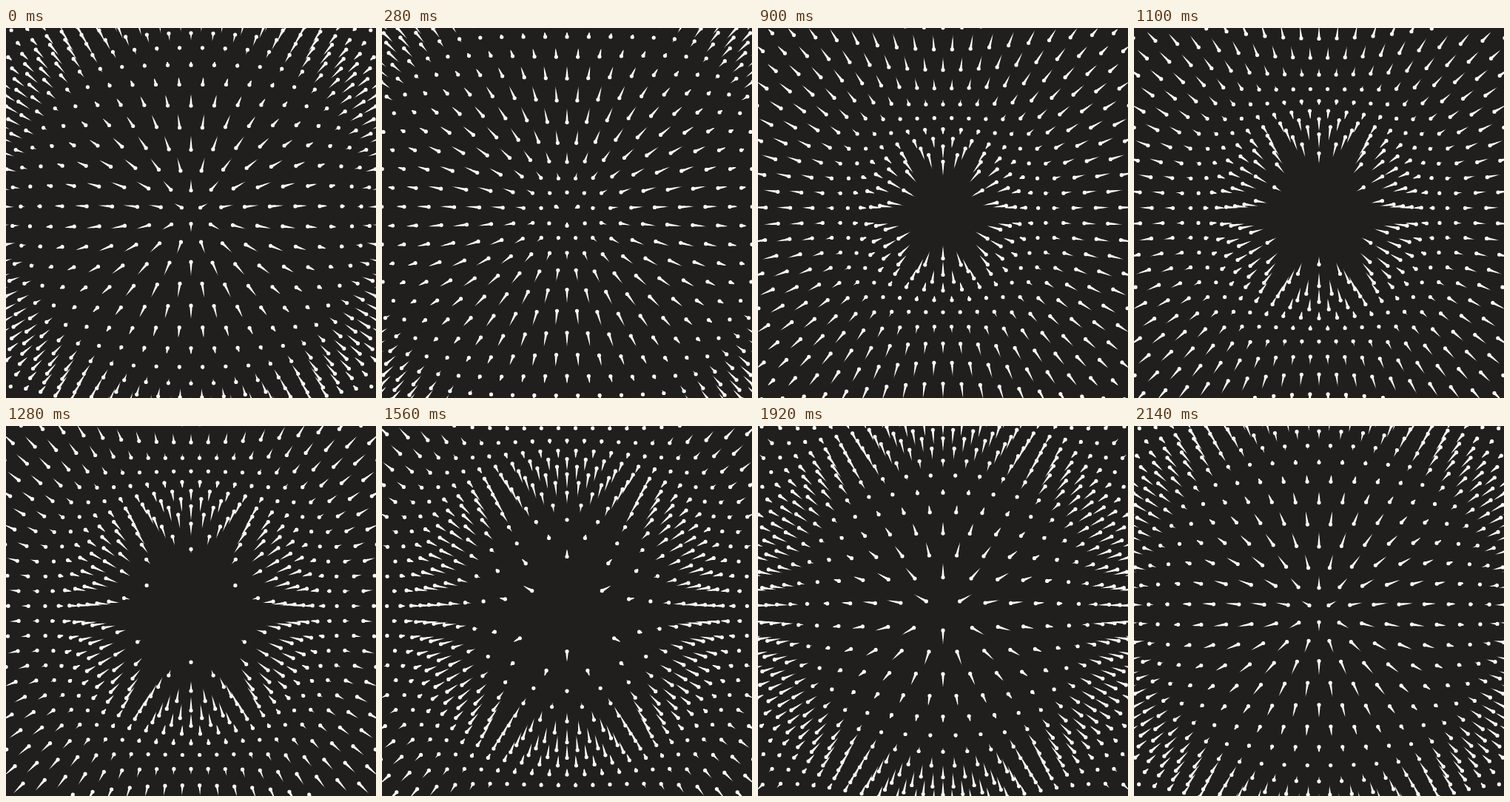
These frames come from a looping animation (500x500 px, 2160 ms). An HTML page with a canvas:

```html
<!DOCTYPE html>
<html lang="en">
<head>
<meta charset="utf-8">
<title>Radial wave</title>
<style>
  html, body { margin: 0; width: 100%; height: 100%; overflow: hidden; background: #201f1e; }
  canvas { display: block; width: 500px; height: 500px; }
</style>
</head>
<body>
<canvas id="stage" width="500" height="500"></canvas>
<script>
const SIZE = 500, CENTER = SIZE / 2;
const LOOP = 2160, TICK = 20;
const ROW = 20, COLUMN = ROW * 2 / Math.sqrt(3);
const WAVELENGTH = 360, PUSH = 57, DELAY = 20;
const HEAD = 2.6, TAIL = 1.9, TRAIL = 0.12, TRAIL_STEPS = 24;
const TAU = Math.PI * 2;

const ctx = document.getElementById('stage').getContext('2d');

// Triangular lattice with the centroid of one triangle at the middle of the stage.
const points = [];
for (let j = -18; j <= 18; j++) {
  const y = ROW * (j + 2 / 3);
  const shift = j % 2 ? COLUMN / 2 : 0;
  for (let i = -16; i <= 16; i++) {
    const x = i * COLUMN + shift;
    const radius = Math.hypot(x, y);
    if (radius < 365) points.push({ radius, ux: x / radius, uy: y / radius });
  }
}

function waveRadius(radius, phase) {
  return radius + PUSH / 2 * (1 - Math.cos(TAU * (phase - radius / WAVELENGTH)));
}

function addDot({ radius, ux, uy }, phase, size) {
  const r = waveRadius(radius, phase);
  const x = CENTER + r * ux, y = CENTER + r * uy;
  ctx.moveTo(x + size, y);
  ctx.arc(x, y, size, 0, TAU);
}

function draw(time) {
  const phase = (time - DELAY) / LOOP;
  ctx.fillStyle = '#201f1e';
  ctx.fillRect(0, 0, SIZE, SIZE);
  ctx.fillStyle = '#fafaf7';
  ctx.beginPath();
  for (const point of points) {
    addDot(point, phase, HEAD);
    // The tail follows earlier positions and narrows to a point.
    for (let k = 1; k < TRAIL_STEPS; k++) {
      const age = k / TRAIL_STEPS;
      addDot(point, phase - age * TRAIL, TAIL * (1 - age));
    }
  }
  ctx.fill();
}

const start = performance.now();
function frame() {
  const elapsed = (performance.now() - start) % LOOP;
  draw(Math.floor(elapsed / TICK) * TICK);
  requestAnimationFrame(frame);
}
frame();
</script>
</body>
</html>
```
